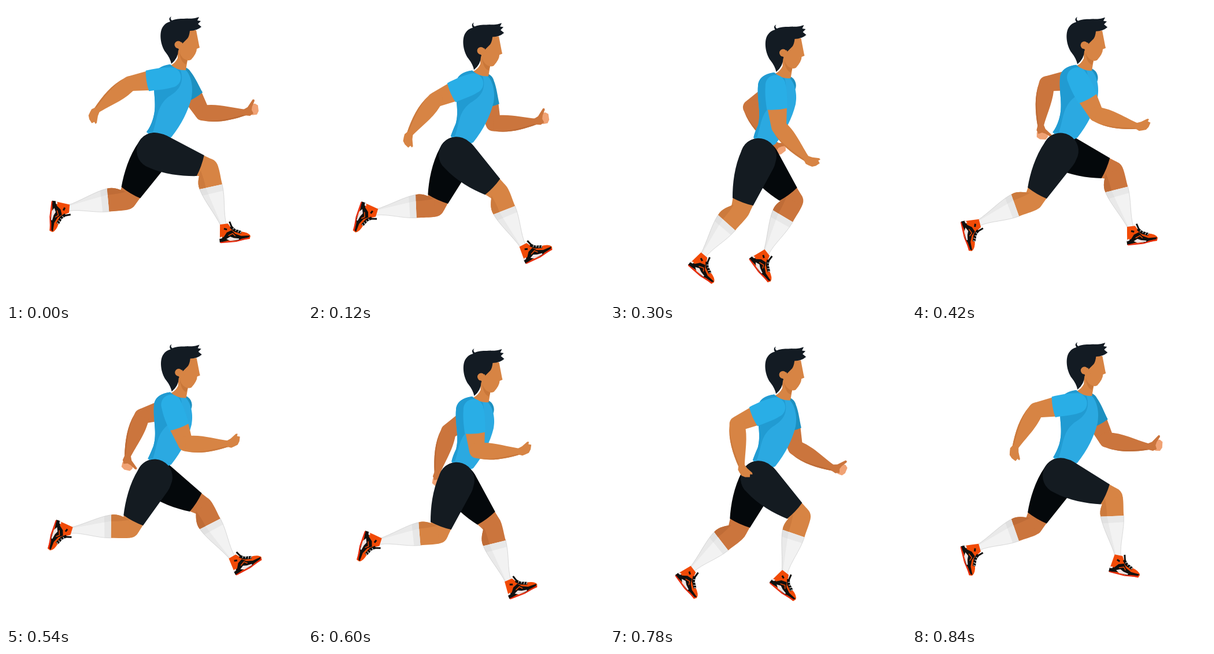
An HTML page with a canvas that plays this animation: 512x512 px, repeating every 900 ms.

```html
<!DOCTYPE html>
<html>
<head>
<meta charset="utf-8">
<style>
html, body { margin: 0; width: 100%; height: 100%; overflow: hidden; background: #fff; }
canvas { display: block; }
</style>
</head>
<body>
<canvas id="stage" width="512" height="512"></canvas>
<script>
const ctx = document.getElementById('stage').getContext('2d');
const STEPS = 15, STEP_MS = 60;
const HAIR = '#131b23', SKIN = '#d78444', SHADE = '#c97739';
const NEAR = { skin: SKIN, shade: '#cc7a3d', shorts: '#141b21', sleeve: '#29aee6' };
const FAR = { skin: '#cb753d', shade: '#bf6c37', shorts: '#04080b', sleeve: '#1d90c0' };

// Joint angles in degrees, keyed by position in the 15-step cycle.
const mirror = keys => keys.concat(
  keys.filter(k => k[0] > 0 && k[0] < 7.5).map(([p, a]) => [STEPS - p, a]).reverse());
const thighKeys = mirror([[0, 18.3], [.5, 21], [1, 22.6], [2.5, 52], [3, 62], [4.5, 103.5], [5, 109], [6.5, 119], [7, 119], [7.5, 119.5]]);
const shinKeys = [[0, 75], [1, 59], [1.5, 60], [2.5, 73.5], [3, 85], [4.5, 119], [5, 129], [6.5, 158], [7, 157.5],
  [7.5, 172], [8.5, 179], [10, 172.5], [10.5, 173], [12, 135.6], [12.5, 117.7], [14, 85], [14.5, 73]];
const footKeys = [[0, -7], [1, -27], [1.5, -30], [2.5, -23], [3, -15], [4.5, 22], [5, 39], [6.5, 74], [7, 75],
  [7.5, 95], [8.5, 106], [10, 107], [10.5, 110], [12, 73], [12.5, 52], [14, 12], [14.5, -8]];
const armKeys = mirror([[0, 171], [1, 170], [2.5, 148], [3, 138], [4.5, 97], [5, 85], [6.5, 63], [7, 62], [7.5, 60]]);
const nearForearm = [[0, 141], [3, 111], [5, 49], [7, 16], [10, 1], [12, 49], [14, 119]];
const farForearm = [[2.5, 105], [4.5, 51], [6.5, 9], [7.5, -1], [10.5, 4], [12.5, 58], [14.5, 98]];

// Periodic cubic through the keys.
function curve(keys, phase) {
  const n = keys.length;
  const key = i => {
    const k = keys[(i + n) % n];
    return [k[0] + STEPS * Math.floor(i / n), k[1]];
  };
  const p = phase < keys[0][0] ? phase + STEPS : phase;
  let i = n - 1;
  while (keys[i][0] > p) i--;
  const [a, b, c, d] = [-1, 0, 1, 2].map(o => key(i + o));
  const span = c[0] - b[0], u = (p - b[0]) / span;
  const m = (c[1] - a[1]) / (c[0] - a[0]) * span;
  const q = (d[1] - b[1]) / (d[0] - b[0]) * span;
  return b[1] + u * (m + u * (3 * (c[1] - b[1]) - 2 * m - q + u * (2 * (b[1] - c[1]) + m + q)));
}

const fill = (color, d) => { ctx.fillStyle = color; ctx.fill(new Path2D(d)); };
const line = (color, width, d) => {
  ctx.strokeStyle = color;
  ctx.lineWidth = width;
  ctx.stroke(new Path2D(d));
};
const disc = (color, x, y, r) => {
  ctx.fillStyle = color;
  ctx.beginPath();
  ctx.arc(x, y, r, 0, 7);
  ctx.fill();
};
function at([x, y], degrees, draw) {
  ctx.save();
  ctx.translate(x, y);
  ctx.rotate(degrees * Math.PI / 180);
  draw();
  ctx.restore();
}
const reach = ([x, y], degrees, length) => {
  const a = degrees * Math.PI / 180;
  return [x + length * Math.cos(a), y + length * Math.sin(a)];
};

function shoe() {
  fill('#f14a06', 'M-6 -1L8 -1L13 8L27 15Q42 18 44 25L42 30L-10 30L-8 14Z');
  fill('#10100f', 'M-10 30L-10 23L-2 21L4 14L13 11L18 18L28 23L43 24L41 27L28 28L22 30L5 28Z');
  fill('#eee4e4', 'M2 25L9 22L15 25L24 27L23 29L8 29ZM-9 21L-5 20L-5 23L-10 24Z');
  line('#f14a06', 1.5, 'M6 20L14 17L18 22');
  line('#10100f', 5, 'M12 5L18 12L29 17');
  line('#10100f', 3, 'M11 -4L14 7M0 7L5 9');
  line('#f4f4f4', 1, 'M15 10L19 6M19 13L23 9M23 16L27 11M27 18L30 14');
  line('#e5260a', 2, 'M-9 30L18 31L42 28');
}

function leg(hip, phase, tone) {
  const thigh = curve(thighKeys, phase), shin = curve(shinKeys, phase);
  const knee = reach(hip, thigh, 98);
  at(hip, thigh, () => fill(tone.skin, 'M80 -19L98 -17L98 16L80 19Z'));
  disc(tone.skin, ...knee, 17);
  at(knee, shin, () => {
    fill(tone.skin, 'M0 -17C10 -18 22 -16 33 -16L31 24C18 26 8 18 0 14Z');
    fill(tone.shade, 'M31 24C18 26 8 18 0 14Q14 12 32 13Z');
    fill('#f2f2f2', 'M33 -16C58 -15 80 -5 102 -5L102 5C80 9 52 22 31 24Z');
    fill('#e9e9e9', 'M31 24L32 13Q64 9 102 3L102 5C80 9 52 22 31 24Z');
    fill('rgba(190,190,190,.2)', 'M33 -16L44 -15L43 22L31 24Z');
    line('#c8c8c8', .6, 'M31 24C52 22 80 9 102 5M33 -16C58 -15 80 -5 102 -5');
  });
  at(hip, thigh, () => fill(tone.shorts, 'M84 -19L12 -31Q6 -32 0 -31A31 31 0 0 0 0 31C30 34 60 27 83 19Q86 0 84 -19Z'));
  at(reach(knee, shin, 101), curve(footKeys, phase), shoe);
}

function arm(shoulder, phase, forearmKeys, tone, isFar) {
  const upper = curve(armKeys, phase), fore = curve(forearmKeys, phase);
  const elbow = reach(shoulder, upper, 72);
  at(shoulder, upper, () => fill(tone.skin, 'M38 -17L72 -13L72 13L38 17Z'));
  disc(tone.skin, ...elbow, 13);
  at(elbow, fore, () => {
    fill(tone.skin, 'M0 -13C25 -17 50 -8 75 -5L75 5C50 13 25 18 0 13Z');
    fill(tone.shade, 'M75 5C50 13 25 18 2 13C26 16 50 9 75 3Z');
  });
  at(reach(elbow, fore, 74), fore, () => {
    if (isFar) {
      fill('#f0a274', 'M9 -14L17 -15L22 -12L23 -2L20 4L12 5L7 0Z');
      fill(tone.skin, 'M-3 -5L4 -9L13 -22Q17 -23 16 -19L12 -10L11 -4L14 2L8 6L-3 5Z');
    } else {
      fill(tone.skin, 'M-3 -5L4 -9L13 -17L16 -17L15 -13L20 -12L19 -4L16 2L10 5L5 7L-3 5Z');
    }
  });
  at(shoulder, upper, () => fill(tone.sleeve, 'M0 -18C12 -20 28 -18 41 -18Q44 0 41 18C26 19 12 19 0 17A17.5 17.5 0 0 1 0 -18Z'));
}

function head() {
  fill(SKIN, 'M297 70L297 90Q293 99 284 103Q296 116 311 111L314 93Z');
  fill(SHADE, 'M300 80Q304 92 314 94L311 101Q302 97 300 80Z');
  fill(SKIN, 'M317 42L329 42L334 68L335 72L330 74Q330 82 320 93Q314 96 309 91Q300 85 299 66Z');
  fill(HAIR, 'M286 100Q284 90 276 80C267 68 264 45 272 35Q276 29 284 27Q280 21 286 18Q283 22 287 25C298 20 318 23 327 21L334 19L331 25L337 26L332 31L338 36Q330 43 318 43Q317 52 314 56L305 65L298 77Q298 90 286 100Z');
  disc(SKIN, 298, 67, 6.5);
  fill(SKIN, 'M297 72L304 62L308 72L303 82Z');
}

function torso(b) {
  const t = 18.8 * b, h = 13 * b, m = 16 * b;
  const back = `M284 ${101 + t}C268 ${103 + t} 257 ${110 + t} 256 ${124 + t}` +
    `C254 ${150 + t} 262 ${172 + m} ${254 + 3 * b} ${196 + h}Q250 ${209 + h} ${243 + 7 * b} ${218 + h}`;
  fill('#2ba9e1', back + `L265 ${238 + h}L286 ${227 + m}C304 ${204 + m} 315 ${182 + m} 321 ${158 + m}` +
    `C325 ${136 + t} 318 ${117 + t} 311 ${111 + t}Q296 ${112 + t} 284 ${101 + t}Z`);
  fill('#219bd2', back + `L254 ${218 + h}C262 ${196 + h} 260 ${174 + m} 281 ${157 + t}` +
    `C302 ${145 + t} 308 ${130 + t} 302 ${111 + t}Q292 ${109 + t} 284 ${101 + t}Z`);
}

function draw(step) {
  const b = (1 - Math.cos(step / 7.5 * 2 * Math.PI)) / 2;
  const far = (step + 7.5) % STEPS, hip = [257, 250 + 13 * b], top = 18.8 * b;
  ctx.fillStyle = '#fff';
  ctx.fillRect(0, 0, 512, 512);
  arm([304, 123 + top], far, farForearm, FAR, true);
  leg(hip, far, FAR);
  at([2 * b, top], 0, head);
  torso(b);
  leg(hip, step, NEAR);
  arm([285 + b, 123 + top], step, nearForearm, NEAR, false);
}

function tick() {
  draw(Math.floor(performance.now() / STEP_MS) % STEPS);
  requestAnimationFrame(tick);
}
tick();
</script>
</body>
</html>
```
